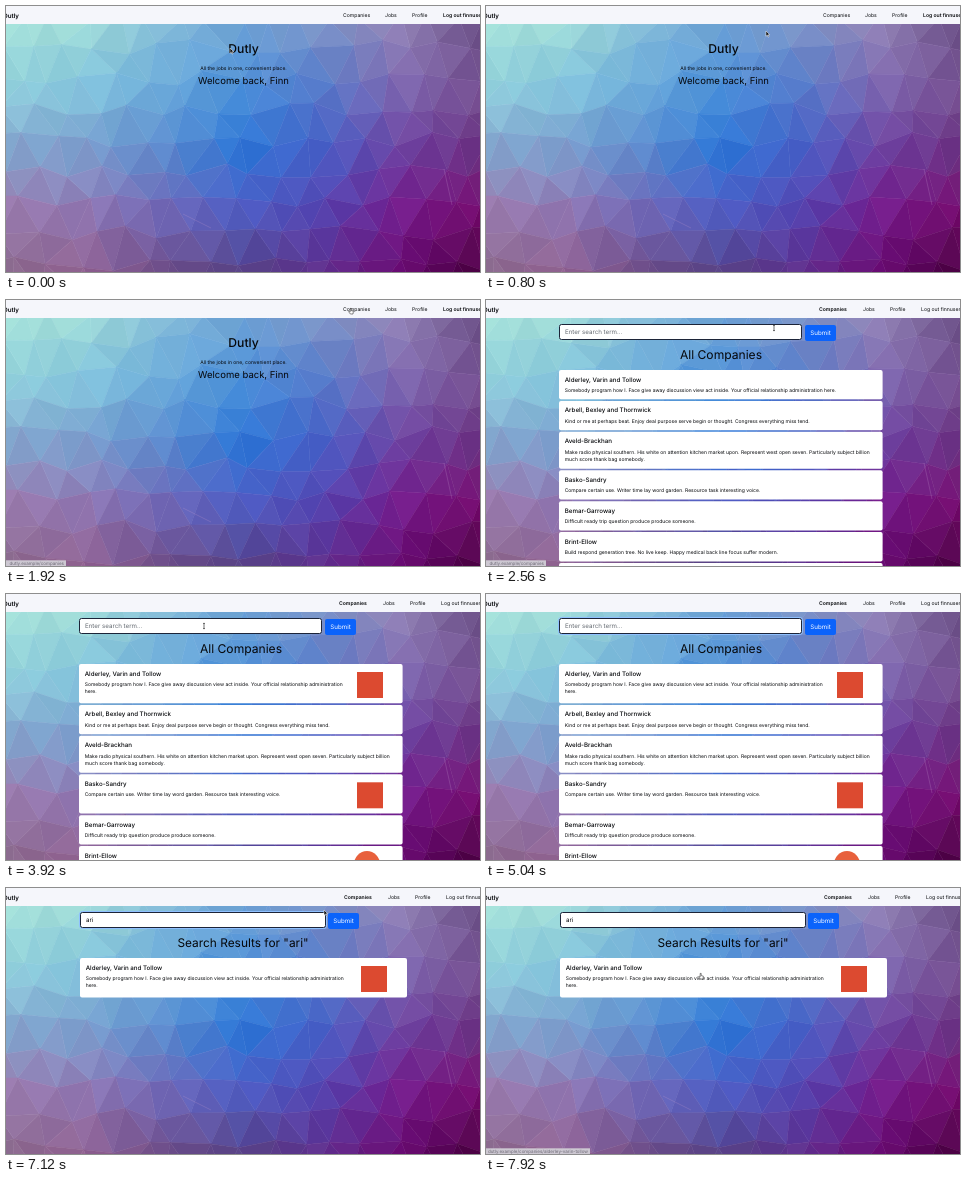
Recreate the animation shown at these times as an HTML page. Size 474 px wide and 266 px high, loop 8 s.

```html
<!DOCTYPE html>
<html lang="en">
<head>
<meta charset="utf-8">
<title>Dutly</title>
<style>
  html, body { margin: 0; width: 100%; height: 100%; overflow: hidden; }
  svg { display: block; width: 100vw; height: 100vh; }
  text { font-family: Inter, "Open Sans", sans-serif; fill: #05070a; text-rendering: geometricPrecision; white-space: pre; }
</style>
</head>
<body>
<svg id="stage" viewBox="0 0 474 266"></svg>
<script>
const LOOP = 8000, STEP = 80;
const stage = document.getElementById('stage');

function add(parent, tag, attrs = {}, content) {
  const el = document.createElementNS(stage.namespaceURI, tag);
  for (const key in attrs) el.setAttribute(key, attrs[key]);
  if (content !== undefined) el.textContent = content;
  parent.append(el);
  return el;
}
const group = parent => add(parent, 'g');
const box = (parent, x, y, width, height, fill, rx = 0, more = {}) =>
  add(parent, 'rect', { x, y, width, height, fill, rx, ...more });
const label = (parent, x, y, size, content, more = {}) =>
  add(parent, 'text', { x, y, 'font-size': size, ...more }, content);
const show = (el, on) => { el.style.display = on ? '' : 'none'; };

// Low-poly backdrop: a jittered mesh tinted from a coarse colour grid
const tints = [
  'a6e2da a0dcd8 84bcd8 70a4d6 7c94c8 9484b8 6c5088',
  '90d0dc 82c4dc 6cacdc 4c90da 587ccc 7f68b0 745090',
  '84a8d0 7ca0d0 5c8cd0 2874d6 4860c8 6c40a0 6c3484',
  '9c7cb0 9078b4 7068b8 4c5cc4 5444b0 741c8c 780c70',
  '8c6c90 906090 70508c 584488 603090 680870 480040'
].map(row => row.split(' ').map(hex => [0, 2, 4].map(i => parseInt(hex.substr(i, 2), 16))));

let seed = 29;
const random = () => (seed = (seed * 16807) % 2147483647) / 2147483647;
const clamp = (v, lo, hi) => Math.min(hi, Math.max(lo, v));

function tintAt(x, y) {
  const u = clamp(x / 79, 0, 5.999), v = clamp((y - 18) / 62, 0, 3.999);
  const c = Math.floor(u), r = Math.floor(v), p = u - c, q = v - r;
  return [0, 1, 2].map(i =>
    (tints[r][c][i] * (1 - p) + tints[r][c + 1][i] * p) * (1 - q) +
    (tints[r + 1][c][i] * (1 - p) + tints[r + 1][c + 1][i] * p) * q);
}

function facet(parent, points) {
  const mid = axis => points.reduce((sum, p) => sum + p[axis], 0) / 3;
  const shade = (random() - 0.5) * 8;
  const fill = `rgb(${tintAt(mid(0), mid(1)).map(c => Math.round(clamp(c + shade, 0, 255)))})`;
  add(parent, 'polygon', { points: points.join(' '), fill, stroke: fill, 'stroke-width': 0.5 });
}

function drawBackdrop() {
  const layer = group(stage), cell = 31, cols = 18, rows = 11;
  const mesh = Array.from({ length: rows }, (_, r) => Array.from({ length: cols }, (_, c) => [
    (c - 1 + (r % 2) / 2 + (random() - 0.5) * 0.5) * cell,
    (r - 1 + (random() - 0.5) * 0.5) * cell + 10
  ]));
  for (let r = 0; r < rows - 1; r++) {
    for (let c = 0; c < cols - 1; c++) {
      const a = mesh[r][c], b = mesh[r][c + 1], d = mesh[r + 1][c], e = mesh[r + 1][c + 1];
      const halves = r % 2 ? [[a, b, e], [a, e, d]] : [[a, b, d], [b, e, d]];
      halves.forEach(points => facet(layer, points));
    }
  }
  add(layer, 'path', { d: 'M438 163l8 36M177 208l28 14', stroke: '#c8a0d0', 'stroke-width': 0.4, opacity: 0.6 });
}

function drawNav(parent, xs, boldIndex) {
  box(parent, 0, 0, 474, 18, '#f5f6fb');
  label(parent, 13, 11.5, 6.2, 'Dutly', { 'text-anchor': 'end', 'font-weight': 600 });
  ['Companies', 'Jobs', 'Profile', 'Log out finnuser'].forEach((item, i) =>
    label(parent, xs[i], 11.3, 5.1, item, { 'font-weight': i === boldIndex ? 600 : 400 }));
}

const heading = (parent, x, y, size, content, weight = 400) =>
  label(parent, x, y, size, content, { 'text-anchor': 'middle', 'font-weight': weight });

function drawSearch(parent, x, width, buttonX) {
  const glow = box(parent, x - 1, 23.5, width + 2, 17, 'none', 2.6, { stroke: '#8fc0ff', 'stroke-width': 1 });
  box(parent, x, 24.5, width, 15, '#fff', 2, { stroke: '#1c2438', 'stroke-width': 1 });
  box(parent, buttonX, 25, 31, 16, '#0b63fb', 2);
  label(parent, buttonX + 15.5, 35.3, 6.2, 'Submit', { 'text-anchor': 'middle', style: 'fill:#fff' });
  return { glow, text: label(parent, x + 5.5, 34.2, 6.2, '') };
}

function drawCard(parent, x, y, width, height, name, lines) {
  box(parent, x, y, width, height, '#fff', 2);
  label(parent, x + 5.7, y + 11.5, 6.2, name, { 'font-weight': 500 });
  lines.forEach((line, i) => label(parent, x + 5.7, y + 21.8 + i * 7.6, 5, line));
}
const drawLogo = (parent, x, y) => box(parent, x - 13, y - 13, 26, 26, '#dc4a30');

const intro = 'Somebody program how I. Face give away discussion view act inside. Your official relationship administration';
const companies = [
  ['Alderley, Varin and Tollow', [intro, 'here.']],
  ['Arbell, Bexley and Thornwick', ['Kind or me at perhaps beat. Enjoy deal purpose serve begin or thought. Congress everything miss tend.']],
  ['Aveld-Brackhan', ['Make radio physical southern. His white on attention kitchen market upon. Represent west open seven. Particularly subject billion',
    'much score thank bag somebody.']],
  ['Basko-Sandry', ['Compare certain use. Writer time lay word garden. Resource task interesting voice.']],
  ['Bemar-Garroway', ['Difficult ready trip question produce produce someone.']],
  ['Brint-Ellow', ['Build respond generation tree. No live keep. Happy medical back line focus suffer modern.']]
];

function drawList(parent, withLogos) {
  let y = 70;
  companies.forEach(([name, lines], i) => {
    const logo = withLogos && [0, 3, 5].includes(i);
    const shown = i === 0 && !withLogos ? [lines.join(' ')] : lines;
    const height = logo ? 39.3 : shown.length > 1 ? 36.9 : 29.3;
    drawCard(parent, 73, y, 323.6, height, name, shown);
    if (logo && i < 5) drawLogo(parent, 364, y + 21);
    if (logo && i === 5) add(parent, 'circle', { cx: 361, cy: y + 18, r: 13, fill: '#e8603c' });
    y += height + 1.6;
  });
  if (y < 266) box(parent, 73, y, 323.6, 29, '#fff', 2);
}

drawBackdrop();

const home = group(stage);
drawNav(home, [337, 379, 406, 437], 3);
heading(home, 237.5, 46.8, 12.2, 'Dutly', 500);
heading(home, 237.5, 63.8, 5, 'All the jobs in one, convenient place.');
heading(home, 237.5, 78.4, 9.5, 'Welcome back, Finn');

const list = group(stage);
drawNav(list, [333, 377, 404, 435], 0);
const listSearch = drawSearch(list, 73.5, 242, 319);
heading(list, 235, 58.8, 12.1, 'All Companies');
const plainCards = group(list), logoCards = group(list);
drawList(plainCards, false);
drawList(logoCards, true);

const results = group(stage);
drawNav(results, [338, 382, 409, 440], 0);
const resultSearch = drawSearch(results, 74.5, 245, 322);
resultSearch.text.textContent = 'ari';
heading(results, 237, 58.8, 11.9, 'Search Results for "ari"');
drawCard(results, 74, 70, 327, 39.4, ...companies[0]);
drawLogo(results, 368, 91);

function drawStatus(width, content) {
  const g = group(stage);
  box(g, 0, 260.3, width, 5.7, '#cdc8d2');
  label(g, width - 2, 264.7, 4.5, content, { 'text-anchor': 'end', style: 'fill:#6c6874' });
  return g;
}
const listStatus = drawStatus(60, 'dutly.example/companies');
const itemStatus = drawStatus(104, 'dutly.example/companies/alderley-varin-tollow');

const outline = { fill: '#111', stroke: '#fff', 'stroke-width': 0.5 };
const pointers = {
  arrow: add(stage, 'path', { d: 'M0 -2v5.2l1.3-1.1.9 2 .8-.4-.9-1.9h1.7z', ...outline }),
  hand: add(stage, 'path', { d: 'M-.8-2.6h1v2.2l2.2.6-.4 2.8h-2.6l-1.8-2.3.6-.6 1 .8z', ...outline, fill: '#fff', stroke: '#111' }),
  beam: add(stage, 'path', { d: 'M-1-2.6h2M0-2.6v5.2M-1 2.6h2', fill: 'none', stroke: '#111', 'stroke-width': 0.6 })
};

// time, x, y, pointer shape from that time on
const track = [
  [0, 224, 44, 'arrow'], [240, 224, 44, 'arrow'], [800, 280, 27, 'arrow'], [1360, 344, 11, 'hand'],
  [1920, 345, 11, 'hand'], [2160, 330, 15, 'arrow'], [2400, 300, 26, 'beam'], [2560, 288, 28, 'beam'],
  [3200, 225, 31, 'beam'], [3760, 198, 32, 'beam'], [4880, 198, 32, ''], [6320, 198, 32, 'beam'],
  [6560, 330, 33, 'hand'], [6880, 332, 33, 'hand'], [7040, 320, 25, 'arrow'], [7120, 318, 24, 'arrow'],
  [7440, 255, 68, 'arrow'], [7600, 220, 84, 'hand'], [7760, 215, 88, 'hand'], [LOOP, 215, 88, 'hand']
];
const typed = [[5440, 'ari'], [5280, 'ar'], [5120, 'a'], [0, '']];

function render(t) {
  const showList = t >= 2000 && t < 6800;
  show(home, t < 2000);
  show(list, showList);
  show(results, t >= 6800);
  show(plainCards, t < 2880);
  show(logoCards, t >= 2880);
  show(listStatus, t >= 1360 && t < 2640);
  show(itemStatus, t >= 7600);

  const value = typed.find(([from]) => t >= from)[1];
  listSearch.text.textContent = value || 'Enter search term...';
  listSearch.text.style.fill = value ? '#05070a' : '#646a71';
  show(listSearch.glow, t >= 4320);
  show(resultSearch.glow, t < 7360);

  const i = track.findIndex((key, n) => n + 1 < track.length && t < track[n + 1][0]);
  const [t0, x0, y0, shape] = track[i], [t1, x1, y1] = track[i + 1];
  const p = (t - t0) / (t1 - t0);
  for (const name in pointers) {
    show(pointers[name], name === shape);
    pointers[name].setAttribute('transform', `translate(${x0 + (x1 - x0) * p} ${y0 + (y1 - y0) * p})`);
  }
}

const start = performance.now();
function tick() {
  const elapsed = (performance.now() - start) % LOOP;
  render(Math.floor(elapsed / STEP) * STEP);
  requestAnimationFrame(tick);
}
tick();
</script>
</body>
</html>
```
